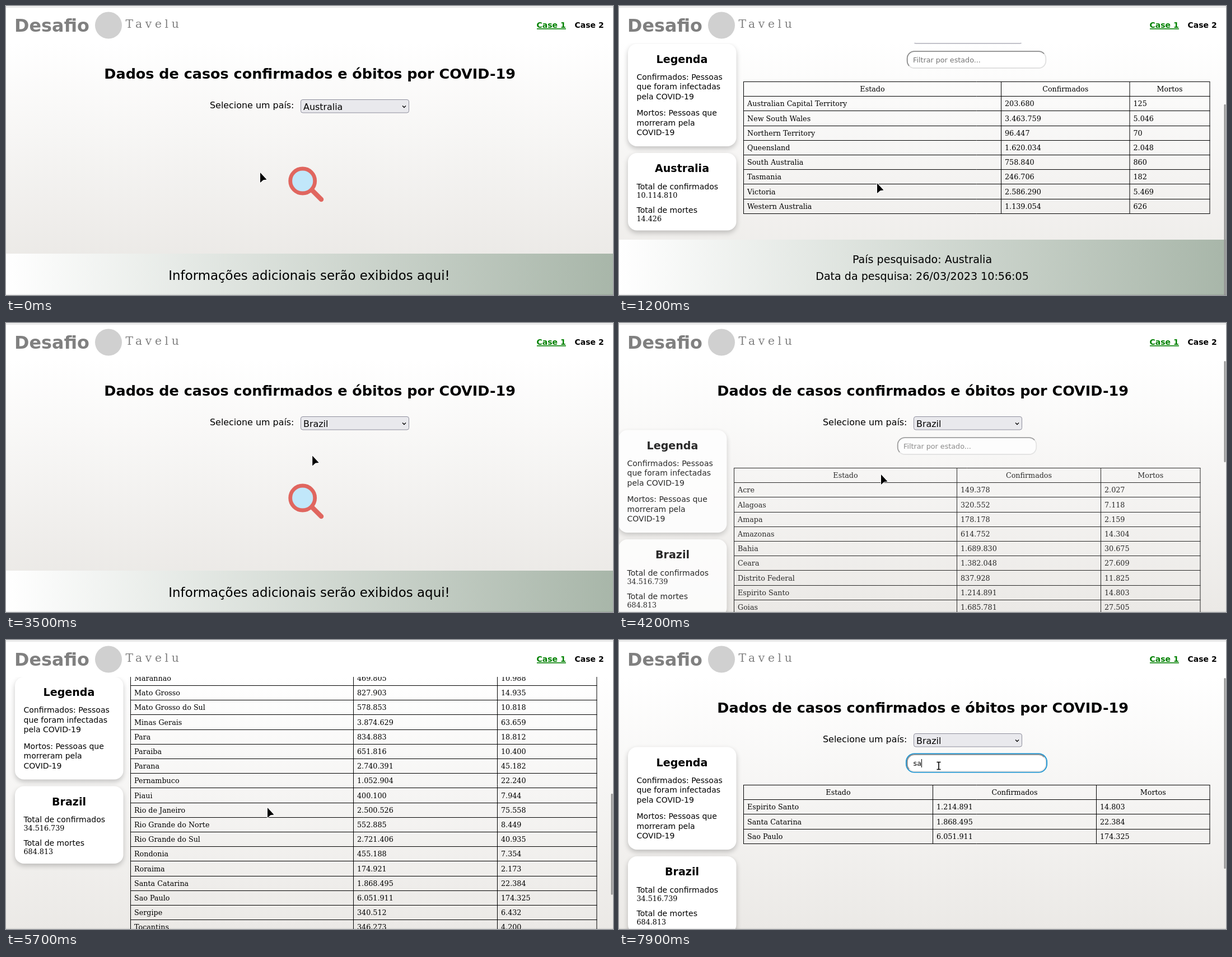
Write an HTML page with a canvas that moves like this. It is 1084 by 517 pixels and loops after 8 s.

```html
<!DOCTYPE html>
<html lang="pt">
<head>
<meta charset="utf-8">
<title>Dados de COVID-19</title>
<style>
html, body { margin: 0; width: 100%; height: 100%; overflow: hidden; background: #fff; }
canvas { display: block; }
</style>
</head>
<body>
<canvas id="stage" width="1084" height="517"></canvas>
<script>
const W = 1084, H = 517, TOP = 66, LOOP = 8000;
const REM = 12.73, ROW = 26.19, TABLE_Y = 259.5;
const SANS = '"DejaVu Sans", sans-serif';
const SERIF = '"DejaVu Serif", serif';
const stage = document.getElementById('stage').getContext('2d');
const layer = Object.assign(document.createElement('canvas'), { width: W, height: H }).getContext('2d');
let ctx = stage;

const parse = s => s.split(';').map(r => r.split(','));
const countries = {
  Australia: {
    total: ['10.114.810', '14.426'], time: '10:56:05', cols: [682.5, 912],
    rows: parse('Australian Capital Territory,203.680,125;New South Wales,3.463.759,5.046;' +
      'Northern Territory,96.447,70;Queensland,1.620.034,2.048;South Australia,758.840,860;' +
      'Tasmania,246.706,182;Victoria,2.586.290,5.469;Western Australia,1.139.054,626')
  },
  Brazil: {
    total: ['34.516.739', '684.813'], time: '10:56:09', cols: [620.5, 877.5],
    rows: parse('Acre,149.378,2.027;Alagoas,320.552,7.118;Amapa,178.178,2.159;' +
      'Amazonas,614.752,14.304;Bahia,1.689.830,30.675;Ceara,1.382.048,27.609;' +
      'Distrito Federal,837.928,11.825;Espirito Santo,1.214.891,14.803;Goias,1.685.781,27.505;' +
      'Maranhao,469.805,10.988;Mato Grosso,827.903,14.935;Mato Grosso do Sul,578.853,10.818;' +
      'Minas Gerais,3.874.629,63.659;Para,834.883,18.812;Paraiba,651.816,10.400;' +
      'Parana,2.740.391,45.182;Pernambuco,1.052.904,22.240;Piaui,400.100,7.944;' +
      'Rio de Janeiro,2.500.526,75.558;Rio Grande do Norte,552.885,8.449;' +
      'Rio Grande do Sul,2.721.406,40.935;Rondonia,455.188,7.354;Roraima,174.921,2.173;' +
      'Santa Catarina,1.868.495,22.384;Sao Paulo,6.051.911,174.325;' +
      'Sergipe,340.512,6.432;Tocantins,346.273,4.200')
  }
};

// [time, value...] keys, linear in between
const scrollKeys = [[0, 0], [900, 0], [1000, 40], [1100, 100], [1200, 124], [1800, 124], [2200, 0],
  [4500, 0], [4800, 230], [4900, 230], [5000, 380.5], [5100, 604], [5600, 604],
  [5900, 190], [6000, 190], [6200, 0], [8000, 0]];
const mouseKeys = [[0, 454, 298], [700, 461, 317], [1800, 461, 317], [2400, 593, 207],
  [2700, 615, 182], [3300, 600, 215], [3800, 468, 271], [4200, 468, 271], [4500, 467, 300],
  [6400, 467, 300], [6900, 575, 222], [7200, 575, 222], [7900, 571, 225], [8000, 571, 225]];

function sample(keys, t) {
  let i = 1;
  while (i < keys.length - 1 && keys[i][0] < t) i++;
  const a = keys[i - 1], b = keys[i];
  const p = Math.min(1, (t - a[0]) / (b[0] - a[0]));
  return a.slice(1).map((v, k) => v + (b[k + 1] - v) * p);
}

function text(str, x, y, size, { font = SANS, bold = false, color = '#000', align = 'left' } = {}) {
  ctx.font = `${bold ? 'bold ' : ''}${size * REM}px ${font}`;
  ctx.fillStyle = color;
  ctx.textAlign = align;
  ctx.fillText(str, x, y);
}

function box(x, y, w, h, r) {
  ctx.beginPath();
  ctx.roundRect(x, y, w, h, r);
}

function poly(points) {
  ctx.beginPath();
  points.forEach(([x, y]) => ctx.lineTo(x, y));
  ctx.closePath();
}

function stroke(color, width) {
  ctx.strokeStyle = color;
  ctx.lineWidth = width;
  ctx.stroke();
}

function fill(color) {
  ctx.fillStyle = color;
  ctx.fill();
}

// Paints a group on its own layer, then blends it as one picture
function fade(alpha, paint) {
  ctx = layer;
  ctx.clearRect(0, 0, W, H);
  ctx.save();
  paint();
  ctx.restore();
  ctx = stage;
  ctx.globalAlpha = alpha;
  ctx.drawImage(layer.canvas, 0, 0);
  ctx.globalAlpha = 1;
}

function backdrop(bottom) {
  const g = ctx.createLinearGradient(0, TOP, 0, bottom);
  g.addColorStop(0, '#fff');
  g.addColorStop(1, '#ebe9e6');
  ctx.fillStyle = g;
  ctx.fillRect(0, TOP, W, H - TOP);
}

function header() {
  ctx.fillStyle = '#fff';
  ctx.fillRect(0, 0, W, TOP);
  ctx.fillStyle = '#dcdcdc';
  ctx.fillRect(0, 1, W, 1.5);
  text('Desafio', 15, 45.5, 2.5, { bold: true, color: '#808080' });
  ctx.beginPath();
  ctx.arc(183, 34.5, 24, 0, Math.PI * 2);
  fill('#d0d0d0');
  ctx.letterSpacing = '5.6px';
  text('Tavelu', 213.5, 38.5, 1.6, { font: SERIF, color: '#808080' });
  ctx.letterSpacing = '0px';
  text('Case 1', 947.5, 39, 1.1, { bold: true, color: '#008000' });
  ctx.fillRect(948, 40, 52, 1.6);
  text('Case 2', 1015.5, 39, 1.1, { bold: true });
}

function intro(country) {
  text('Dados de casos confirmados e óbitos por COVID-19', 542.6, 129.7, 2, { bold: true, align: 'center' });
  text('Selecione um país:', 364, 182.7, 1.25);
  box(526.5, 167.5, 193, 23.5, 3.5);
  fill('#e9e9ed');
  stroke('#8f8f9d', 1);
  text(country, 531, 185.5, 1.25);
  ctx.beginPath();
  ctx.moveTo(708, 178.5);
  ctx.lineTo(711, 181.5);
  ctx.lineTo(714, 178.5);
  stroke('#000', 1.3);
}

function card(y, h, title) {
  ctx.save();
  ctx.shadowColor = 'rgba(0,0,0,0.22)';
  ctx.shadowBlur = 10;
  ctx.shadowOffsetY = 4;
  box(16, y, 193.5, h, 16);
  fill('#fff');
  ctx.restore();
  text(title, 112.5, y + 34, 1.5, { bold: true, align: 'center' });
}

function sidebar(country, data) {
  card(191.5, 183.5, 'Legenda');
  ['Confirmados: Pessoas', 'que foram infectadas', 'pela COVID-19'].forEach((s, i) => text(s, 31.5, 255.7 + i * 17.5, 1.1));
  ['Mortos: Pessoas que', 'morreram pela', 'COVID-19'].forEach((s, i) => text(s, 31.5, 320 + i * 17.5, 1.1));
  card(387, 138.5, country);
  ['Total de confirmados', 'Total de mortes'].forEach((s, i) => {
    text(s, 31.5, 451.6 + i * 42, 1.1);
    text(data.total[i], 31.5, 466.5 + i * 42, 1, { font: SERIF });
  });
}

function filterInput(query, focused) {
  const frame = () => box(514.7, 205.2, 247.6, 29.8, REM);
  if (focused) {
    box(513, 203.5, 251, 33, 14.5);
    stroke('#1391d2', 2);
  }
  frame();
  fill('#fff');
  stroke('#e0e0e0', 1.8);
  ctx.save();
  poly([[510, 240], [510, 200], [768, 200], [750, 219], [529, 219]]);
  ctx.clip();
  frame();
  stroke('#8e8e8e', 1.8);
  ctx.restore();
  if (query) text(query, 525.5, 224.6, 1);
  else text('Filtrar por estado...', 525, 224.6, 1, { color: '#757575' });
  if (focused) {
    const x = query ? 526 + ctx.measureText(query).width : 525;
    ctx.fillStyle = '#000';
    ctx.fillRect(Math.round(x), 213, 1, 15);
  }
}

function table(rows, cols) {
  const xs = [222.5, ...cols, 1055];
  const bottom = TABLE_Y + (rows.length + 1) * ROW;
  ctx.beginPath();
  for (const x of xs) {
    ctx.moveTo(x, TABLE_Y);
    ctx.lineTo(x, bottom);
  }
  for (let i = 0; i <= rows.length + 1; i++) {
    const y = Math.floor(TABLE_Y + i * ROW) + 0.5;
    ctx.moveTo(222, y);
    ctx.lineTo(1055.5, y);
  }
  stroke('#000', 1);
  ['Estado', 'Confirmados', 'Mortos'].forEach((s, i) =>
    text(s, (xs[i] + xs[i + 1]) / 2, 277.2, 1, { font: SERIF, align: 'center' }));
  rows.forEach((row, r) => row.forEach((s, i) =>
    text(s, xs[i] + 6.5, 303.4 + r * ROW, 1, { font: SERIF })));
}

function footer(y, h, lines, size) {
  const g = ctx.createLinearGradient(0, 0, W, 0);
  g.addColorStop(0, '#fff');
  g.addColorStop(1, '#a8b6a9');
  ctx.fillStyle = g;
  ctx.fillRect(0, y, W, h);
  lines.forEach(([s, dy]) => text(s, 541.5, y + dy, size, { align: 'center' }));
}

function magnifier() {
  ctx.beginPath();
  ctx.moveTo(546, 329);
  ctx.lineTo(563, 346);
  ctx.lineCap = 'round';
  stroke('#e0665f', 8.5);
  ctx.lineCap = 'butt';
  ctx.beginPath();
  ctx.arc(529.7, 313, 22, 0, Math.PI * 2);
  fill('#c1e7fa');
  stroke('#e0665f', 6.8);
}

function pointer(x, y, beam) {
  ctx.save();
  ctx.translate(x, y);
  ctx.lineJoin = 'round';
  if (beam) {
    ctx.beginPath();
    ctx.moveTo(-3.5, -6.5);
    ctx.lineTo(3.5, -6.5);
    ctx.moveTo(0, -6.5);
    ctx.lineTo(0, 6.5);
    ctx.moveTo(-3.5, 6.5);
    ctx.lineTo(3.5, 6.5);
    stroke('#fff', 3.2);
    stroke('#000', 1.6);
  } else {
    poly([[0, 0], [11.5, 12.5], [5.5, 13.2], [0, 18]]);
    stroke('#fff', 2);
    fill('#000');
  }
  ctx.restore();
}

function results(t, country, scroll, enter) {
  const data = countries[country];
  const query = t >= 7600 ? 'sa' : t >= 7300 ? 's' : '';
  const rows = data.rows.filter(r => r[0].toLowerCase().includes(query));
  const cols = query === 'sa' ? [560.5, 852.5] : data.cols;
  const footY = Math.max(542, TABLE_Y + (rows.length + 1) * ROW + 29.5);
  const end = footY + 99;

  ctx.save();
  ctx.translate(0, -scroll);
  intro(country);
  footer(footY, 99, [['País pesquisado: ' + country, 42], ['Data da pesquisa: 26/03/2023 ' + data.time, 72]], 1.5);
  ctx.restore();

  fade(enter, () => {
    ctx.translate(Math.round(-100 * (1 - enter)), -scroll);
    filterInput(query, t >= 7000);
    table(rows, cols);
    ctx.translate(0, scroll - Math.min(scroll, 125.5));
    sidebar(country, data);
  });

  const thumb = 449 * 451 / (end - TOP) - 11;
  box(1080.5, 68 + (449 - thumb) * scroll / (end - H), 3, thumb, 1.5);
  fill('#959595');
}

function draw(t) {
  const country = t < 3300 ? 'Australia' : 'Brazil';
  const loading = t < 100 || (t >= 3300 && t < 3800);
  const start = t < 3300 ? 100 : 4000;
  const enter = 1 - Math.pow(1 - Math.min(1, Math.max(0, (t - start) / 400)), 2.55);
  const [scroll] = sample(scrollKeys, t);
  const [mx, my] = sample(mouseKeys, t);

  ctx.clearRect(0, 0, W, H);
  backdrop(loading ? 460 : H);
  if (loading) {
    intro(country);
    magnifier();
    footer(443, 74, [['Informações adicionais serão exibidos aqui!', 47]], 1.8);
  } else if (t >= start) {
    results(t, country, scroll, enter);
  } else {
    intro(country);
  }
  ctx.fillStyle = 'rgba(0,0,0,0.07)';
  ctx.fillRect(0, H - 1.5, W, 1.5);
  header();

  const overInput = mx > 514 && mx < 763 && my > 203 && my < 237;
  pointer(mx, my, overInput && !loading && t >= start && scroll === 0);
}

const begin = performance.now();
function tick() {
  const t = (performance.now() - begin) % LOOP;
  draw(Math.floor(t / 100) * 100);
  requestAnimationFrame(tick);
}
tick();
</script>
</body>
</html>
```
